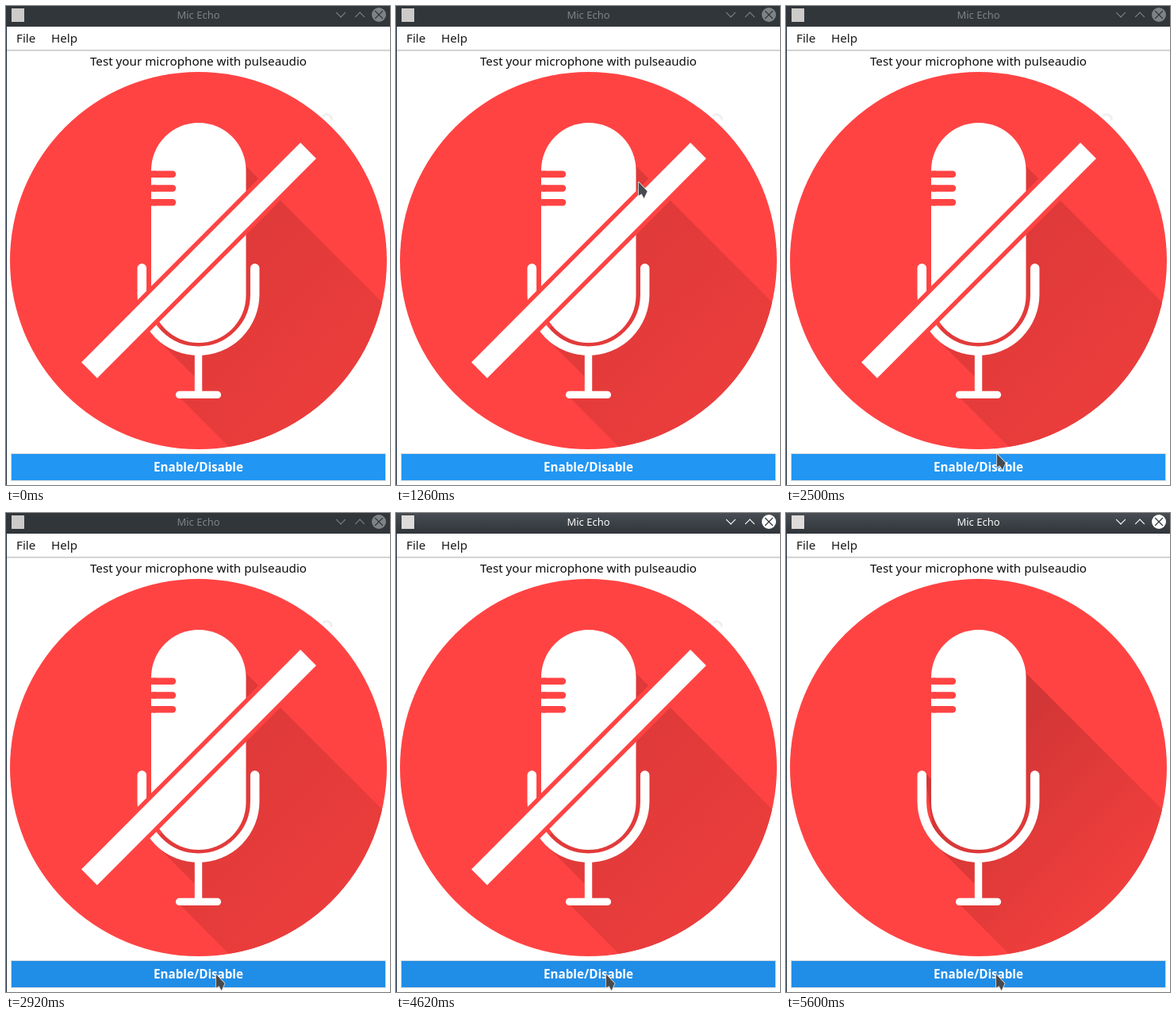
Animation, 484 px wide and 603 px high, one loop 8000 ms. Source, as an HTML page with a canvas:

```html
<!DOCTYPE html>
<html lang="en">
<head>
<meta charset="utf-8">
<title>Mic Echo</title>
<style>
  html, body { margin: 0; width: 484px; height: 603px; overflow: hidden; background: #fff; }
  canvas { display: block; }
</style>
</head>
<body>
<canvas id="stage" width="484" height="603"></canvas>
<script>
const ctx = document.getElementById('stage').getContext('2d');
const LOOP = 8000, TOGGLE = 4880;
const RED = '#ff4343', WHITE = '#fff';
const CX = 242.5;
const FONT = '"Noto Sans", "Open Sans", sans-serif';

const ramp = (t, from, to) => Math.max(0, Math.min(1, (t - from) / (to - from)));
const mix = (a, b, k) => 'rgb(' + a.map((v, i) => Math.round(v + (b[i] - v) * k)) + ')';

function rect(x, y, w, h, fill) {
  ctx.fillStyle = fill;
  ctx.fillRect(x, y, w, h);
}

function line(x1, y1, x2, y2, color, width, cap = 'round') {
  ctx.beginPath();
  ctx.moveTo(x1, y1);
  ctx.lineTo(x2, y2);
  ctx.strokeStyle = color;
  ctx.lineWidth = width;
  ctx.lineCap = cap;
  ctx.stroke();
}

function disc(x, y, r, fill) {
  ctx.beginPath();
  ctx.arc(x, y, r, 0, Math.PI * 2);
  ctx.fillStyle = fill;
  ctx.fill();
}

function text(str, x, y, size, color, align = 'center', weight = 400) {
  ctx.font = `${weight} ${size}px ${FONT}`;
  ctx.textAlign = align;
  ctx.fillStyle = color;
  ctx.fillText(str, x, y);
}

// dir 1 points down, -1 points up
function chevron(x, y, dir, color) {
  for (const side of [-1, 1]) {
    line(x, y + 2.75 * dir, x + 5.5 * side, y - 2.75 * dir, color, 1.2);
  }
}

function titleBar(t) {
  const focus = ramp(t, 4310, 4620);
  const ink = mix([126, 131, 134], [252, 252, 252], focus);
  const bg = ctx.createLinearGradient(0, 0, 0, 26);
  bg.addColorStop(0, mix([49, 54, 59], [71, 77, 82], focus));
  bg.addColorStop(1, mix([49, 54, 59], [48, 53, 58], focus));
  rect(0, 0, 484, 26, bg);
  rect(7, 3, 16, 17, mix([205, 203, 201], [222, 220, 218], focus));
  text('Mic Echo', CX, 16, 13, ink);
  chevron(422, 11.2, 1, ink);
  chevron(446, 10.8, -1, ink);
  disc(470, 11, 9, ink);
  for (const d of [-4.5, 4.5]) line(470 - d, 6.5, 470 + d, 15.5, '#31363b', 1.2);
}

function menu() {
  text('File', 13, 46, 15.2, '#1a1a1a', 'left');
  text('Help', 57, 46, 15.2, '#1a1a1a', 'left');
  ['#c4c4c4', '#e6e6e6', '#f7f7f7'].forEach((c, i) => rect(0, 55 + i, 484, 1, c));
  text('Test your microphone with pulseaudio', CX, 75, 15.2, '#0c0c0c');
}

// Sweeps an edge down and right at 45 degrees
function cast(x1, y1, x2, y2, reach = 400) {
  ctx.beginPath();
  ctx.moveTo(x1, y1);
  ctx.lineTo(x1 + reach, y1 + reach);
  ctx.lineTo(x2 + reach, y2 + reach);
  ctx.lineTo(x2, y2);
  ctx.fill();
}

function shadow(muted) {
  const g = ctx.createLinearGradient(260, 300, 430, 470);
  g.addColorStop(0, muted ? '#df3939' : '#d33636');
  g.addColorStop(1, muted ? '#ea3d3c' : '#f03f3d');
  ctx.save();
  ctx.beginPath();
  ctx.arc(CX, 320.5, 237.5, 0, Math.PI * 2);
  ctx.clip();
  ctx.fillStyle = g;
  cast(302, 201, 188, 417);
  cast(CX, 440, CX, 490);
  cast(216, 490, 266, 490);
  if (!muted) cast(175, 327, 188, 417);
  ctx.restore();
}

function mic() {
  ctx.beginPath();
  ctx.roundRect(183, 147, 119.5, 277, 59.75);
  ctx.fillStyle = WHITE;
  ctx.fill();
  for (let i = 0; i < 3; i++) {
    const y = 211.7 + 17.8 * i;
    line(187, y, 210, y, RED, 8.4);
    rect(182.5, y - 4.2, 6, 8.4, RED);
  }
  const r = 71.2;
  ctx.beginPath();
  ctx.moveTo(CX - r, 330);
  ctx.arc(CX, 363, r, Math.PI, 0, true);
  ctx.lineTo(CX + r, 330);
  ctx.strokeStyle = WHITE;
  ctx.lineWidth = 11.5;
  ctx.lineCap = 'round';
  ctx.stroke();
  line(CX, 438, CX, 488, WHITE, 9.4, 'butt');
  line(CX - 24, 489.4, CX + 24, 489.4, WHITE, 9.2);
}

function slash() {
  line(381, 182, 105, 458.5, RED, 39, 'butt');
  line(381, 182, 105, 458.5, WHITE, 28, 'butt');
}

function badge(muted) {
  if (muted) {
    ctx.beginPath();
    ctx.arc(404, 143, 6.5, -2.4, 0.1);
    ctx.strokeStyle = '#f0f0f0';
    ctx.lineWidth = 3;
    ctx.lineCap = 'butt';
    ctx.stroke();
  }
  disc(CX, 320.5, 237.5, RED);
  shadow(muted);
  mic();
  if (muted) slash();
}

function button(t) {
  rect(6, 563, 473, 35, '#d6dade');
  rect(7, 564, 471, 33, mix([33, 150, 243], [32, 141, 231], ramp(t, 2520, 2800)));
  if (t >= TOGGLE) {
    const grow = 1 - (1 - ramp(t, 4770, 5300)) ** 2;
    rect(CX - 235.5 * grow, 564, 471 * grow, 33, `rgba(0,0,0,${0.06 * (1 - grow)})`);
  }
  text('Enable/Disable', CX, 586, 15.2, WHITE, 'center', 700);
}

// Moves p to (x, y) between two times, bending sideways by bow
function glide(p, k, x, y, bow = 0) {
  p.x += (x - p.x) * k - bow * Math.sin(Math.PI * k);
  p.y += (y - p.y) * k;
}

function pointerAt(t) {
  const p = { x: 112, y: -6 };
  glide(p, ramp(t, 400, 860), 215, 63);
  glide(p, ramp(t, 960, 1140), 299, 187);
  glide(p, ramp(t, 1230, 1260), 305, 221);
  glide(p, ramp(t, 1970, 2500), 265, 563, 90);
  glide(p, ramp(t, 2520, 2680), 259, 577);
  glide(p, ramp(t, 2780, 2920), 264, 580);
  return p;
}

function pointer(t) {
  if (t < 420) return;
  const p = pointerAt(t);
  ctx.save();
  ctx.translate(Math.round(p.x), Math.round(p.y));
  ctx.lineJoin = 'round';
  ctx.lineWidth = 1.6;
  ctx.strokeStyle = '#e8e8e8';
  ctx.fillStyle = '#474b4f';
  const arrow = new Path2D('M.8 .8V17.5L4.6 15.4L7.6 21L11.6 12.2Z');
  ctx.stroke(arrow);
  ctx.fill(arrow);
  ctx.restore();
}

function draw(t) {
  rect(0, 0, 484, 603, WHITE);
  menu();
  badge(t < TOGGLE);
  button(t);
  rect(0, 26, 1, 577, '#1c2a3c');
  titleBar(t);
  pointer(t);
}

const start = performance.now();
function tick() {
  draw((performance.now() - start) % LOOP);
  requestAnimationFrame(tick);
}
tick();
</script>
</body>
</html>
```
